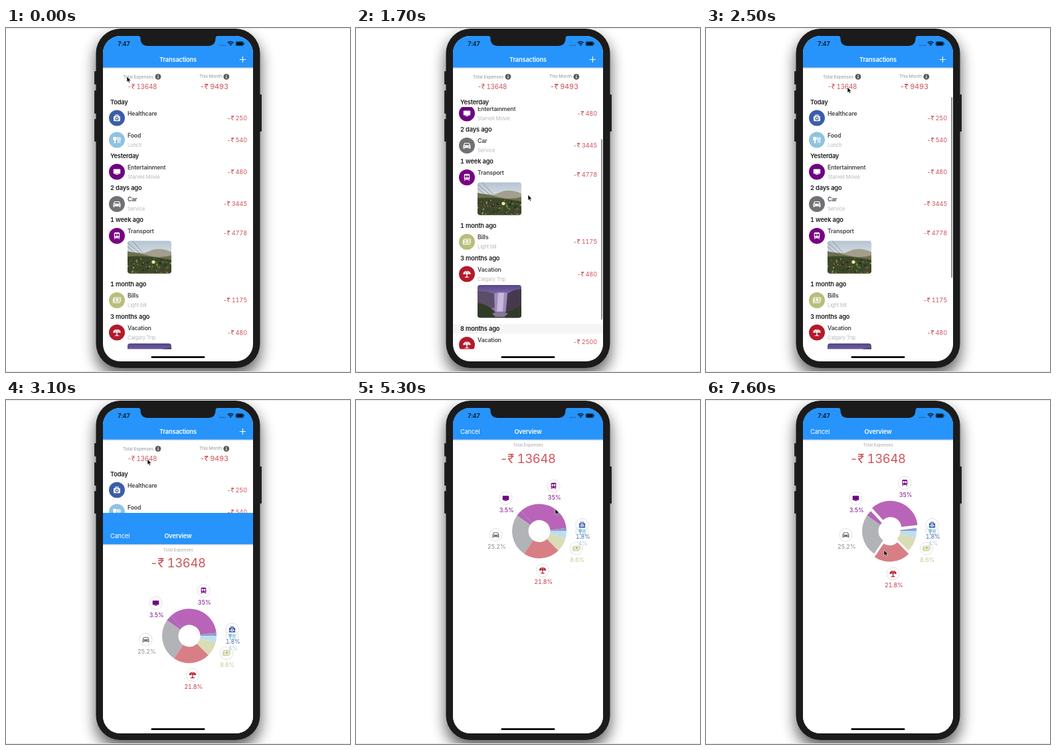
Write an HTML page that moves like this. It is 518 by 518 pixels and loops after 8 s.

```html
<!DOCTYPE html>
<html lang="en">
<head>
<meta charset="utf-8">
<title>Transactions</title>
<style>
  html, body { margin: 0; width: 100%; height: 100%; overflow: hidden; background: #fff; }
  svg { display: block; width: 100vw; height: 100vh; }
  text { font-family: Inter, Roboto, sans-serif; letter-spacing: -.02em; font-variant-numeric: tabular-nums; white-space: pre; }
  .modal { animation: slide 8s infinite; }
  .cursor { animation: point 8s linear infinite; }
  .slice-transport { animation: lift-transport 8s infinite; }
  .slice-vacation { animation: lift-vacation 8s infinite; }
  @keyframes slide {
    0% { transform: translateY(490px); }
    37.23% { transform: translateY(490px); animation-timing-function: cubic-bezier(.36, .66, .04, 1); }
    43.48%, 100% { transform: translateY(0); }
  }
  @keyframes lift-transport {
    0%, 67.5% { transform: translate(0, 0); }
    70%, 100% { transform: translate(1.8px, -4.7px); }
  }
  @keyframes lift-vacation {
    0%, 90% { transform: translate(0, 0); }
    92.5%, 100% { transform: translate(.6px, 5px); }
  }
  @keyframes point {
    0%, 1.25% { transform: translate(182px, 73px); }
    5%, 5.6% { transform: translate(258px, 335px); }
    11.25% { transform: translate(261px, 210px); }
    13.75%, 15% { transform: translate(262px, 164px); }
    16.9% { transform: translate(261px, 190px); }
    21.25% { transform: translate(259px, 251px); }
    22.5% { transform: translate(257px, 262px); }
    26.25% { transform: translate(209px, 118px); }
    30%, 44% { transform: translate(213px, 89px); }
    47.5% { transform: translate(220px, 91px); }
    51% { transform: translate(337px, 212px); }
    55%, 61.5% { transform: translate(270px, 150px); }
    66.25%, 82% { transform: translate(300px, 164px); }
    92.5% { transform: translate(270px, 232px); }
    95%, 100% { transform: translate(268px, 226px); }
  }
</style>
</head>
<body>
<svg id="stage" viewBox="0 0 518 518"></svg>
<script>
const BLUE = '#2694fb', RED = '#cf555b';
const PIN = 111.5, HEADER = 15, LIST_TOP = 104, LIST_HEIGHT = 379;
const BAR = 272, MAX_SCROLL = 149, LOOP = 8000;

// y is the vertical centre of the capitals
const text = (x, y, str, size, fill, weight = 400, anchor = 'start') =>
  `<text x="${x}" y="${y + size * .36}" font-size="${size}" fill="${fill}" font-weight="${weight}" text-anchor="${anchor}">${str}</text>`;
const rect = (x, y, w, h, fill, rx = 0) =>
  `<rect x="${x}" y="${y}" width="${w}" height="${h}" rx="${rx}" fill="${fill}"/>`;
const circle = (x, y, r, fill, extra = '') =>
  `<circle cx="${x}" cy="${y}" r="${r}" fill="${fill}" ${extra}/>`;
const path = (d, fill, stroke = 'none', width = 1) =>
  `<path d="${d}" fill="${fill}" stroke="${stroke}" stroke-width="${width}"/>`;
const at = (x, y, content, scale = 1) =>
  `<g transform="translate(${x} ${y}) scale(${scale})">${content}</g>`;

// Icons fit a 12 px box around the origin
const icons = {
  health: (ink, cut) => path('M-2-2.6V-4.4H2V-2.6', 'none', ink, 1.2) + rect(-5, -2.8, 10, 7.6, ink, 1.3) +
    circle(0, 1, 2.6, cut) + path('M0-.6V2.6M-1.6 1H1.6', 'none', ink, 1.1),
  food: (ink) => path('M-5.6-4.5H-.6V-1Q-.6 1.2-2.3 1.5V3.8H-1V4.8H-5V3.8H-3.8V1.5Q-5.6 1.2-5.6-1Z', ink) +
    path('M.4-4.5H1V-2H1.5V-4.5H2.1V-2H2.6V-4.5H3.1V-1.2Q3.1-.2 2.4 0V4.8H1.1V0Q.4-.2.4-1.2ZM3.8-4.5Q5.8-4 5.8 0H5V4.8H3.8Z', ink),
  tv: (ink) => rect(-5.2, -4, 10.4, 7, ink, .8) + rect(-2.2, 3.4, 4.4, 1, ink),
  car: (ink, cut) => path('M-3.6-4H3.6L5.4 0V4.7H3.6V3.4H-3.6V4.7H-5.4V0Z', ink) +
    path('M-2.9-2.9H2.9L3.9-.4H-3.9Z', cut) + circle(-3.3, 1.5, .8, cut) + circle(3.3, 1.5, .8, cut),
  train: (ink, cut) => rect(-4.2, -5.2, 8.4, 8.6, ink, 1.5) + rect(-3.1, -2.9, 2.7, 3, cut) + rect(.4, -2.9, 2.7, 3, cut) +
    circle(-2, 1.7, .7, cut) + circle(2, 1.7, .7, cut) + path('M-2.4 3.2L-3.8 5.2M2.4 3.2L3.8 5.2', 'none', ink),
  bill: (ink, cut) => rect(-5, -4.4, 11, 6.6, ink, .6) + rect(-4.1, -3.5, 9.2, 4.8, cut) + circle(.5, -1.1, 1.9, ink) +
    path('M-5.6-2.6V3.8H4.6M-3-2.6V.4M4-2.6V.4', 'none', ink),
  umbrella: (ink, cut) => path('M-5.8.2A5.8 5 0 0 1 5.8.2Z', ink) + path('M-2.1.2Q-2.2-2.8 0-4.8Q2.2-2.8 2.1.2', 'none', cut, .6) +
    path('M0 0V4.6', 'none', ink, 1.3) + path('M-4 5.3Q0 2.2 4 5.3Z', ink),
};

const kinds = {
  Healthcare: ['health', '#3b5ea9'],
  Food: ['food', '#8fc3df'],
  Entertainment: ['tv', '#6d0480'],
  Car: ['car', '#707175'],
  Transport: ['train', '#780381'],
  Bills: ['bill', '#b9be7b'],
  Vacation: ['umbrella', '#b31a2b'],
};

function meadow() {
  let seed = 7, dots = '';
  const random = () => (seed = seed * 16807 % 2147483647) / 2147483647;
  for (let i = 0; i < 90; i++) {
    const y = 27 + random() * 23;
    dots += circle(random() * 66, y, .5 + random(), ['#79403c', '#5d7339', '#222d18', '#8d8f5a'][i % 4]);
  }
  return rect(0, 0, 66, 50, 'url(#sky)') + path('M0 18Q12 17 24 19L40 13Q54 11 66 17V50H0Z', '#a39f8c') +
    path('M0 16Q18 19 34 23T66 22V50H0Z', '#6b7050') + path('M0 24Q25 21 66 29V50H0Z', '#3c4729') + dots +
    path('M0 3L20 20M0 9L18 24M7 0L24 19', 'none', '#59615c', .5) + circle(39, 32, 2.6, '#e7e28a') + circle(39, 32, 1, '#f8f5d0');
}
const falls = () => rect(0, 0, 66, 50, 'url(#dusk)') + path('M0 9L14 10L27 14L26 34L0 38Z', '#5a4d66') +
  path('M66 6L54 8L45 13L42 50H66Z', '#453a4b') + path('M25 13Q34 9 45 12L42 40H26Z', '#9f8abd') +
  path('M31 12L29 40H38L40 12Z', '#c9b8da') + path('M0 27Q14 28 27 41Q45 45 66 30V50H0Z', '#303c26') +
  path('M22 43Q34 37 46 43L40 48H27Z', '#85779a');
const rapids = () => rect(0, 0, 66, 50, '#3a3c33') + path('M0 0H34L22 14L0 20Z', '#626450') + path('M44 0H66V26L50 18Z', '#24261f') +
  path('M48 0Q44 10 32 15Q16 20 10 32L4 50H26Q28 38 36 30Q42 38 44 50H58Q58 30 48 21Q52 10 58 3Z', '#d3d5d4') +
  path('M50 3Q46 15 34 20Q20 25 14 46M42 22Q50 32 51 48', 'none', '#fff', 3) + path('M28 30Q35 30 41 50H24Z', '#30322c') +
  path('M0 30L9 27L3 50H0Z', '#4e5934');

const sections = [
  ['Today', 111.5, [['Healthcare', 250], ['Food', 540, 'Lunch']]],
  ['Yesterday', 192.5, [['Entertainment', 480, 'Starveil Movie']]],
  ['2 days ago', 241, [['Car', 3445, 'Service']]],
  ['1 week ago', 289, [['Transport', 4778, '', meadow]]],
  ['1 month ago', 386, [['Bills', 1175, 'Light bill']]],
  ['3 months ago', 434.5, [['Vacation', 480, 'Calgary Trip', falls]]],
  ['8 months ago', 541, [['Vacation', 2500, '', rapids]]],
];

function row([kind, amount, note, photo], y) {
  const [icon, color] = kinds[kind];
  const photoY = y + (note ? 40.5 : 31.3);
  return circle(167, y + 24, 12, color) + at(167, y + 24, icons[icon]('#fff', color)) +
    text(183, y + 17, kind, 8.74, '#454545', 600) +
    (note ? text(183, y + 31.3, note, 7.64, '#b9b9b9') : '') +
    text(363, y + (photo && !note ? 19.5 : 24), `-₹ ${amount}`, 9.28, RED, 400, 'end') +
    (photo ? at(183, photoY, `<g clip-path="url(#photo)">${photo()}</g>`) : '');
}
const rows = sections.map(([, y, items]) => items.map((item, i) => row(item, y + i * 33)).join('')).join('');
const headers = sections.map(([name], i) => `<g class="header">${
  rect(146, -7.5, 226, HEADER, i === sections.length - 1 ? '#f5f5f5' : '#fff')}${text(157, 0, name, 9.28, '#1c1c1c', 600)}</g>`).join('');

const info = x => circle(x, 73.3, 4.4, '#5b5b5b') + rect(x - .6, 72.6, 1.2, 3.2, '#fff') + circle(x, 71, .7, '#fff');
const navbar = title => rect(146, 59, 226, 3, 'url(#edge)') + rect(146, 12, 226, 47.5, BLUE) +
  text(259, 47.5, title, 9.28, '#fff', 600, 'middle');

// share, slice colour, label position, text colour; counter-clockwise from the right
const shares = [
  ['Healthcare', 1.8, '#8c9fcd', 340.5, 188, '#4a68ae'],
  ['Transport', 35, '#b964b8', 297.5, 129.5, '#7d0a86'],
  ['Entertainment', 3.5, '#b066b9', 225.5, 148, '#780b88'],
  ['Car', 25.2, '#b2b3b6', 210.5, 203, '#8c8d90'],
  ['Vacation', 21.8, '#d87f86', 281, 256.5, '#c0394a'],
  ['Bills', 8.6, '#dadcb5', 332, 223.5, '#c5c991'],
  ['Food', 4, '#bfdeed', 340.5, 198.5, '#a5d0e7'],
];
function donut() {
  const total = shares.reduce((sum, s) => sum + s[1], 0);
  const polar = (r, a) => `${276 + r * Math.cos(a)} ${197.5 + r * Math.sin(a)}`;
  let angle = 0;
  return shares.map(([kind, share, fill, x, y, ink]) => {
    const start = angle, end = angle -= share / total * 2 * Math.PI;
    const d = `M${polar(41, start)}A41 41 0 0 0 ${polar(41, end)}L${polar(16.5, end)}A16.5 16.5 0 0 1 ${polar(16.5, start)}Z`;
    const [icon, color] = kinds[kind];
    return `<g class="slice-${kind.toLowerCase()}">${path(d, fill)}${
      circle(x, y, 9.6, 'none', 'stroke="#d9d9d9" stroke-width=".8"')}${at(x, y, icons[icon](color, '#fff'), .92)}${
      text(x + 1.2, y + 17.7, share + '%', 8.9, ink, 400, 'middle')}</g>`;
  }).join('');
}

const gradient = (id, ...stops) => `<linearGradient id="${id}" x2="0" y2="1">${
  stops.map(([color, opacity = 1], i) => `<stop offset="${i / (stops.length - 1)}" stop-color="${color}" stop-opacity="${opacity}"/>`).join('')}</linearGradient>`;

document.getElementById('stage').innerHTML = `
  <defs>
    ${gradient('sky', ['#b4c3d2'], ['#dde2e5'], ['#cfd0c5'])}
    ${gradient('dusk', ['#56468a'], ['#9b85bd'], ['#6d5c7c'])}
    ${gradient('edge', ['#000', .22], ['#000', 0])}
    <clipPath id="photo">${rect(0, 0, 66, 49.3, '#000', 4)}</clipPath>
    <clipPath id="list">${rect(146, 102, 226, 381.5, '#000')}</clipPath>
    <clipPath id="screen">${rect(146, 12, 226, 490, '#000', 26)}</clipPath>
    <filter id="blur" x="-30%" y="-30%" width="160%" height="160%"><feGaussianBlur stdDeviation="11"/></filter>
  </defs>
  ${rect(0, 0, 518, 518, '#fff')}
  <g filter="url(#blur)" opacity=".62">${rect(135, 12, 248, 512, '#000', 36)}</g>
  ${rect(0, 0, 518, 1, '#e6e6e6')}${rect(0, 517, 518, 1, '#e6e6e6')}
  ${[[133, 65, 20], [133, 94, 35], [133, 137, 34], [382, 100, 56]].map(([x, y, h]) => rect(x, y, 3, h, '#222', 1)).join('')}
  ${rect(135.5, 1, 247, 511, '#1b1b1b', 37)}
  <g clip-path="url(#screen)">
    ${rect(146, 12, 226, 490, '#fff')}
    ${navbar('Transactions')}
    ${path('M351.8 47.5H361M356.4 42.9V52.1', 'none', '#fff', 1.1)}
    ${text(176, 73.3, 'Total Expenses', 6.7, '#959595')}${info(229)}
    ${text(291, 72.8, 'This Month', 6.7, '#959595')}${info(331.8)}
    ${text(205, 88.5, '-₹ 13648', 9.83, RED, 400, 'middle')}
    ${text(313.3, 88.3, '-₹ 9493', 11, RED, 400, 'middle')}
    <g clip-path="url(#list)"><g id="rows">${rows}</g>${headers}</g>
    <rect id="bar" x="369.2" width="1.7" rx=".85" fill="#7d7d7d"/>
    <g class="modal">
      ${rect(146, 12, 226, 490, '#fff')}
      ${navbar('Overview')}
      ${text(157, 47.5, 'Cancel', 9.28, '#fff')}
      ${text(259, 68, 'Total Expenses', 6.55, '#a9a9a9', 400, 'middle')}
      ${text(258.7, 88, '-₹ 13648', 18.5, RED, 400, 'middle')}
      ${donut()}
    </g>
    ${text(168, 23.7, '7:47', 8.9, '#06131f', 600)}
    ${[322, 324.7, 327.4, 330.1].map(x => circle(x, 26.2, .75, '#124a80')).join('')}
    ${path('M333.7 22.2Q338.2 18.4 342.7 22.2M335.3 24.1Q338.2 21.7 341.1 24.1', 'none', '#06131f', 1.3)}
    ${path('M336.6 25.1Q338.2 23.9 339.8 25.1L338.2 26.9Z', '#06131f')}
    <rect x="346" y="20.5" width="11.6" height="6.2" rx="1.6" fill="none" stroke="#06131f" stroke-width=".6"/>
    ${rect(346.8, 21.3, 10, 4.6, '#06131f', .9)}${rect(358.2, 22.5, .8, 2.2, '#06131f')}
    ${rect(218.5, 494.3, 81, 2.8, '#000', 1.4)}
  </g>
  ${path('M198 11.5Q202.5 11.5 202.5 16Q203 27 214 27H304Q315 27 315.5 16Q315.5 11.5 320 11.5Z', '#1b1b1b')}
  <g class="cursor">${path('M0 0V8.4L1.9 6.7L3.2 9.6L4.6 9L3.4 6.2H6Z', '#000', '#fff', .6)}</g>`;

// time in ms, list offset
const scrollKeys = [[0, 0], [450, 0], [700, 62], [900, 125], [1100, 168], [1180, 160], [1300, 149], [1350, 149],
  [1700, 88], [1800, 66], [1900, 28], [2000, -8], [2050, -10], [2100, -6.5], [2250, -1.5], [2400, 0], [LOOP, 0]];
const clamp = (v, lo, hi) => Math.min(hi, Math.max(lo, v));

function scrollAt(t) {
  const i = scrollKeys.findIndex(([time]) => time > t);
  const [t0, s0] = scrollKeys[i - 1], [t1, s1] = scrollKeys[i];
  return s0 + (s1 - s0) * (t - t0) / (t1 - t0);
}

const list = document.getElementById('rows');
const bar = document.getElementById('bar');
const headerNodes = document.querySelectorAll('.header');
let began;

function draw(now) {
  began ??= now;
  const t = (now - began) % LOOP;
  const scroll = scrollAt(t);
  list.setAttribute('transform', `translate(0 ${-scroll})`);
  headerNodes.forEach((node, i) => {
    const next = sections[i + 1] ? sections[i + 1][1] - scroll - HEADER : Infinity;
    const y = Math.min(Math.max(sections[i][1] - scroll, PIN), next);
    node.setAttribute('transform', `translate(0 ${y})`);
  });
  const inside = clamp(scroll, 0, MAX_SCROLL), over = scroll - inside;
  bar.setAttribute('y', LIST_TOP + inside * (LIST_HEIGHT - BAR) / MAX_SCROLL + Math.max(over, 0));
  bar.setAttribute('height', BAR - Math.abs(over));
  bar.setAttribute('opacity', t < 450 ? 0 : clamp((2800 - t) / 200, 0, 1));
  requestAnimationFrame(draw);
}
requestAnimationFrame(draw);
</script>
</body>
</html>
```
